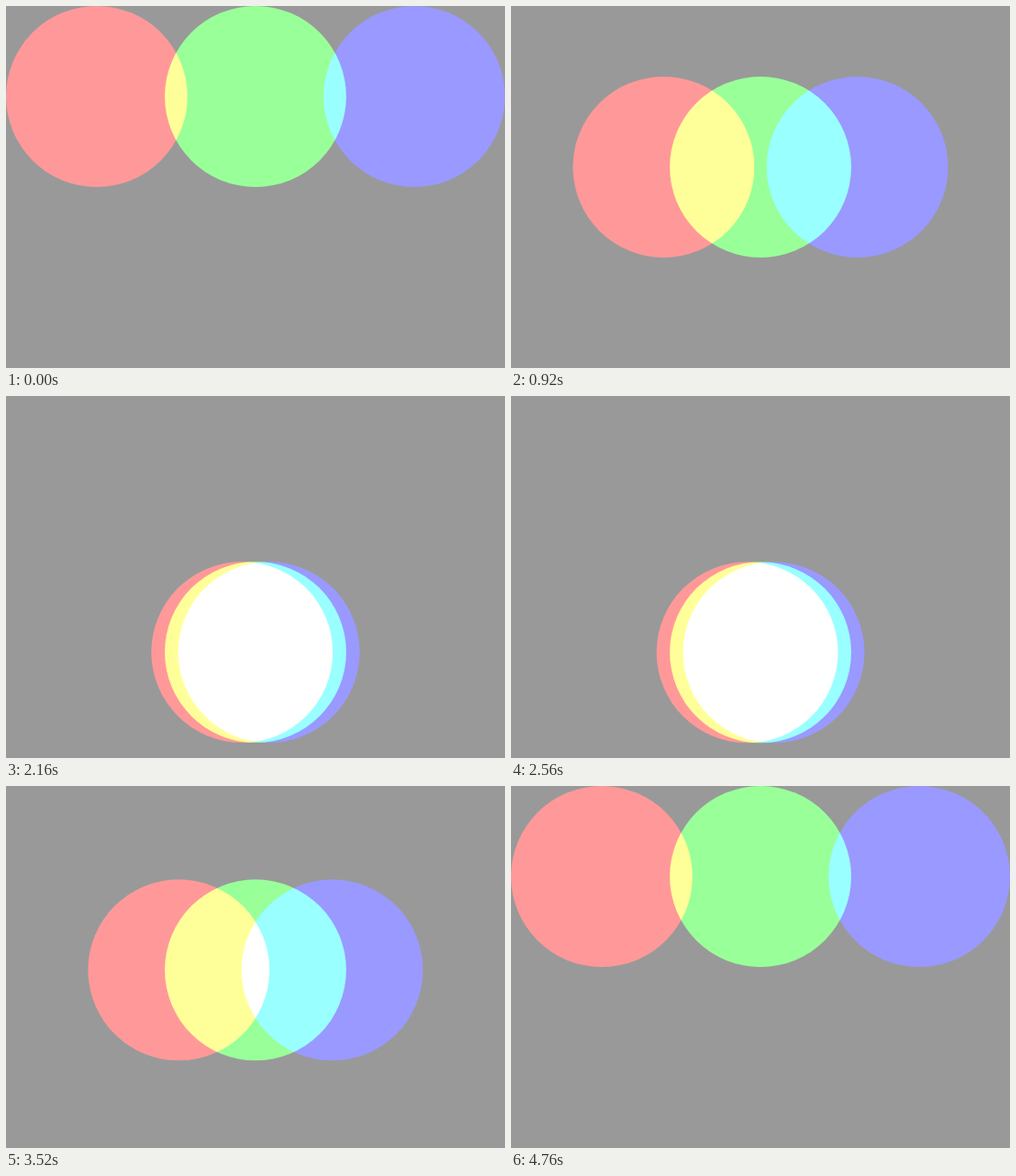
Write an HTML page with a canvas that moves like this. It is 550x400 px and loops after 4.8 s.

```html
<!DOCTYPE html>
<html lang="en">
<head>
<meta charset="utf-8">
<title>Additive colour mixing</title>
<style>
  html, body { margin: 0; width: 100%; height: 100%; overflow: hidden; background: #999; }
  canvas { display: block; }
</style>
</head>
<body>
<canvas id="stage" width="550" height="400"></canvas>
<script>
  const ctx = document.getElementById('stage').getContext('2d');
  const STEP_MS = 40, STEPS = 120, TURN = 59;
  const RADIUS = 100, CENTER_X = 275, SPREAD = 175, DROP = 200;

  // 0 = lamps apart at the top, 1 = lamps merged at the bottom
  function progress(step) {
    return step <= TURN ? step / TURN : (STEPS - 1 - step) / (STEPS - 1 - TURN);
  }

  function lamp(x, y, color) {
    ctx.fillStyle = color;
    ctx.beginPath();
    ctx.arc(x, y, RADIUS, 0, Math.PI * 2);
    ctx.fill();
  }

  function draw(ms) {
    const p = progress(Math.floor(ms / STEP_MS + 1e-3) % STEPS);
    const y = RADIUS + DROP * p;
    const offset = SPREAD * (1 - p);

    ctx.globalCompositeOperation = 'source-over';
    ctx.fillStyle = '#999';
    ctx.fillRect(0, 0, 550, 400);

    // Each lamp adds light in one channel
    ctx.globalCompositeOperation = 'lighter';
    lamp(CENTER_X - offset, y, '#600');
    lamp(CENTER_X, y, '#060');
    lamp(CENTER_X + offset, y, '#006');
  }

  const start = performance.now();
  function tick() {
    draw(performance.now() - start);
    requestAnimationFrame(tick);
  }
  tick();
</script>
</body>
</html>
```
